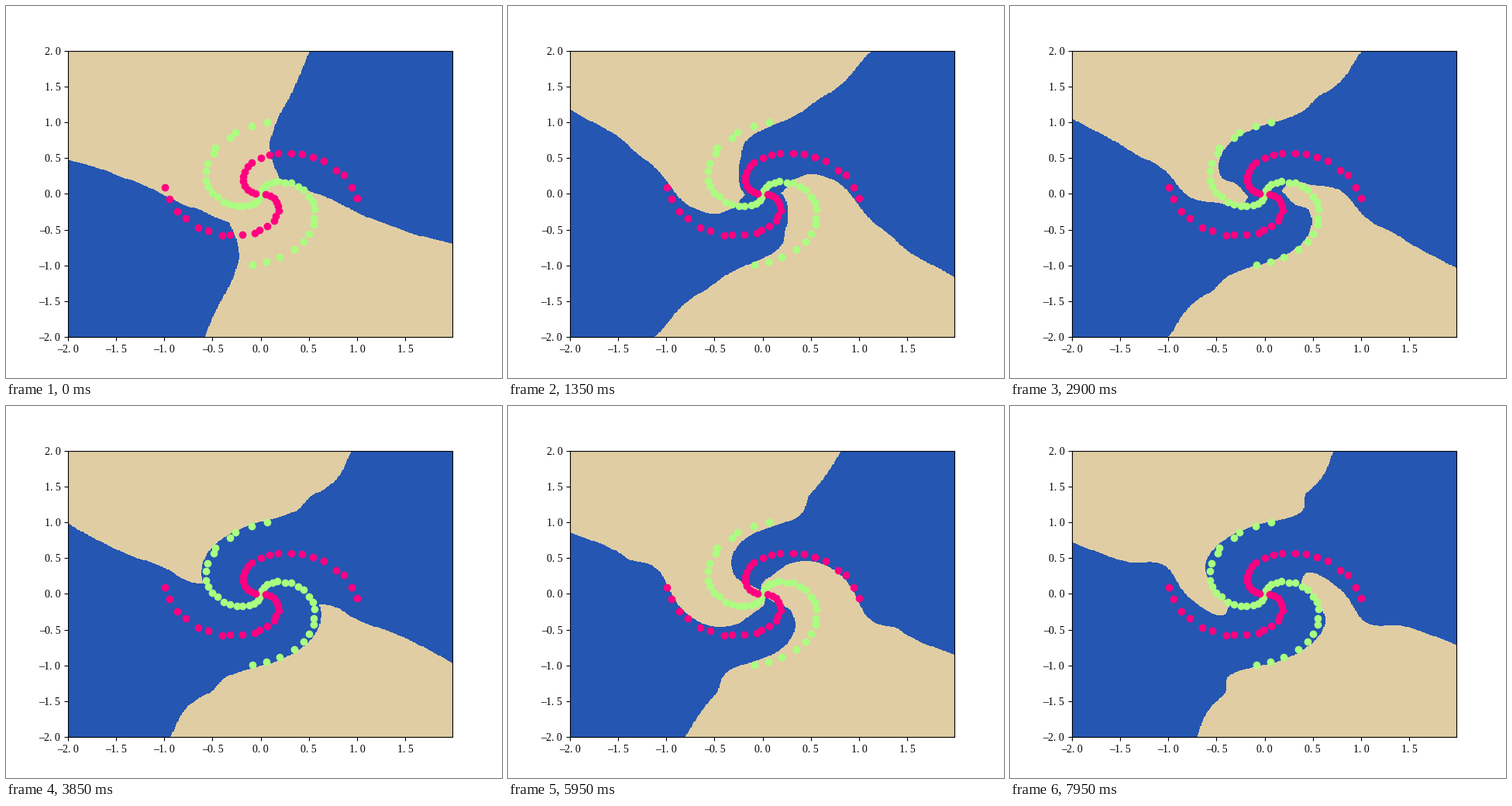
These frames come from a looping animation (640 px wide and 480 px high, 8 s). A matplotlib script:

```python
import numpy as np
import matplotlib.pyplot as plt
from matplotlib.animation import FuncAnimation
from matplotlib.colors import ListedColormap
from matplotlib.ticker import FuncFormatter, MultipleLocator

FRAMES, INTERVAL = 160, 50
SAND, BLUE = "#e0cda4", "#2456b2"
PINK, GREEN = "#ff0080", "#aaff80"

plt.rcParams["font.family"] = "Liberation Serif"
plt.rcParams["font.size"] = 10

X, Y = np.meshgrid(np.arange(-2, 1.985, 0.01), np.arange(2, -1.995, -0.01))

# The blue area is two opposite spiral sectors. Training stages:
# outer angle, inner angle, half-widths at radius 0.25, 0.5 and 0.75 (degrees)
STEPS = [0, 15, 39, 77, 102, 136, 159]
STAGES = np.array([
    (29, 44, -30, 21, 37),
    (14, 68, 105, 47, 48),
    (16, 83, 36, 41, 41),
    (19, 85, 100, 98, 78),
    (21, 94, 34, 37, 38),
    (23, 94, 35, 37, 37),
    (25, 104, 120, 70, 69),
])
RADII = np.array([0.1, 0.25, 0.5, 0.75, 1, 1.5, 2.3])
RING = 36            # sector angle at radius 1, the same at every stage
START_SHIFT = np.array([-0.07, -0.093])


def spline(r, values):
    """Cubic Hermite curve over RADII, flat outside them."""
    values = np.asarray(values, float)
    slope = np.gradient(values, RADII)
    r = np.clip(r, RADII[0], RADII[-1])
    k = np.clip(np.searchsorted(RADII, r) - 1, 0, len(RADII) - 2)
    h = RADII[k + 1] - RADII[k]
    u = (r - RADII[k]) / h
    ease = u * u * (3 - 2 * u)
    return (values[k] * (1 - ease) + values[k + 1] * ease
            + h * u * (1 - u) * ((1 - u) * slope[k] - u * slope[k + 1]))


def decision(i):
    outer, inner, w1, w2, w3 = (np.interp(i, STEPS, col) for col in STAGES.T)
    angles = [inner + 22, inner + 14, inner, RING + 0.6 * (inner - RING),
              RING, outer + 0.25 * (RING - outer), outer]
    widths = [np.clip(3 * w1 - 90, -30, 130), w1, w2, w3,
              45 + 0.3 * (w3 - 45), 45, 45.5]
    sx, sy = START_SHIFT * max(0, 1 - i / STEPS[1])
    r = np.hypot(X - sx, Y - sy)
    theta = np.degrees(np.arctan2(Y - sy, X - sx))
    turn = (theta - spline(r, angles) + 90) % 180 - 90
    return (np.abs(turn) < spline(r, widths)).astype(int)


fig, ax = plt.subplots(figsize=(6.4, 4.8), dpi=100)
area = ax.imshow(decision(0), extent=(-2, 1.99, -2, 2), aspect="auto", vmin=0, vmax=1,
                 cmap=ListedColormap([SAND, BLUE]), interpolation="nearest", zorder=0)

rng = np.random.default_rng(4)
n = np.arange(20)
for start, step, color in [(260, 9.1, GREEN), (81, 9.25, GREEN),
                           (175, 9.4, PINK), (-6, 9.3, PINK)]:
    r = (n + 1) / 20
    a = np.radians(start - step * n + rng.normal(0, 1.3, n.size))
    ax.scatter(r * np.cos(a), r * np.sin(a), color=color, zorder=2)


def label(v, _):
    return f"{v:.1f}".replace(".", ". ").replace("-", "\u2013")


ax.set(xlim=(-2, 1.99), ylim=(-2, 2))
for axis in (ax.xaxis, ax.yaxis):
    axis.set_major_locator(MultipleLocator(0.5))
    axis.set_major_formatter(FuncFormatter(label))


def update(i):
    area.set_data(decision(i))
    return [area]


anim = FuncAnimation(fig, update, frames=FRAMES, interval=INTERVAL, repeat=True, repeat_delay=0)
plt.show()
```
